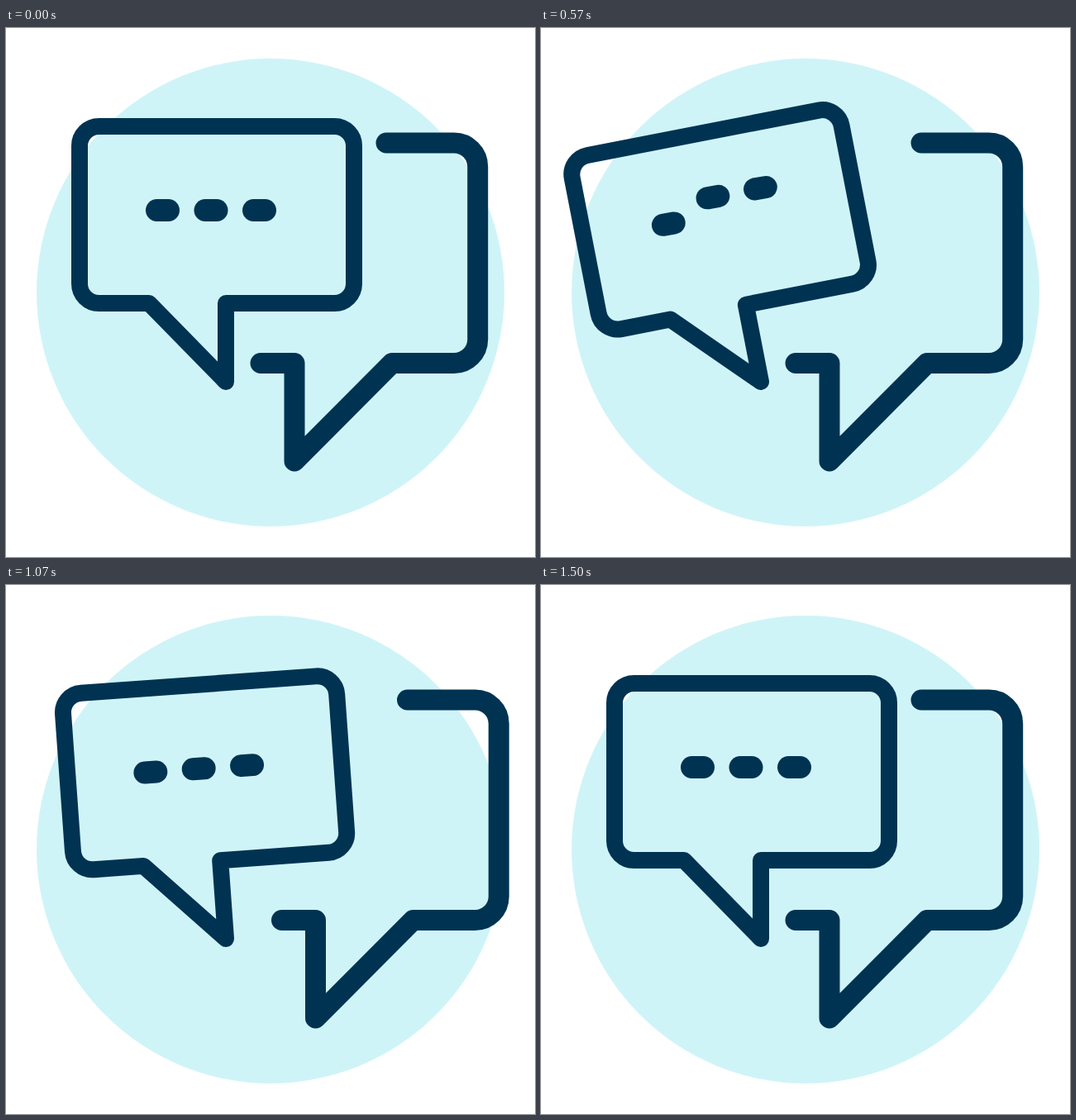
An HTML page for the animation above (2 s loop, 640 by 640 pixels).

```html
<!DOCTYPE html>
<html lang="en">
<head>
<meta charset="utf-8">
<title>Chat bubbles</title>
<style>
  html, body { margin: 0; width: 100%; height: 100%; overflow: hidden; background: #fff; }
  svg { display: block; width: 100%; height: 100%; }
  .line { fill: none; stroke: #003352; stroke-linecap: round; stroke-linejoin: round; }
  .dot { fill: #003352; }
</style>
</head>
<body>
<svg viewBox="0 0 640 640">
  <circle cx="320" cy="320" r="283" fill="#cff4f8"/>
  <path id="back" class="line" stroke-width="25"
    d="M460 139H542A28.7 28.7 0 0 1 570.7 167.7V377A28.7 28.7 0 0 1 542 405.5H467L349 524V405.5H308"/>
  <path id="front" class="line" stroke-width="20"
    d="M266 333H397.5A23.5 23.5 0 0 0 421 309.5V142.5A23.5 23.5 0 0 0 397.5 119H112.5A23.5 23.5 0 0 0 89 142.5V309.5A23.5 23.5 0 0 0 112.5 333H173L266 428Z"/>
  <g id="dots">
    <rect class="dot" x="169" y="207" width="41" height="27" rx="13.5"/>
    <rect class="dot" x="227.5" y="207" width="41" height="27" rx="13.5"/>
    <rect class="dot" x="286" y="207" width="41" height="27" rx="13.5"/>
  </g>
</svg>
<script>
  const LOOP = 2000, FPS = 14;
  const PIVOT = '266 428';
  const HOP = 36, HOP_LEN = 7.9;
  const hopStart = [0, 2.4, 5.65];

  const back = document.getElementById('back');
  const front = document.getElementById('front');
  const dots = document.getElementById('dots');

  // Keys are [step, value]; a third entry is the power of an ease-out into that key.
  const bubbleTilt = [[0, 0], [5.8, 12.5], [6.5, 12.5], [13.2, 0], [15, 4.1], [18.4, 0, 1.9]];
  const dotsTilt = [[0, 0], [5.8, 11.5], [6.3, 11.5], [13.4, 1.1], [15, 4.1], [18.4, 0, 1.9]];
  const backShift = [[12.5, 0], [15, 25.5], [18.3, 0, 1.3]];

  const smooth = p => (1 - Math.cos(Math.PI * p)) / 2;

  function track(keys, s) {
    if (s <= keys[0][0]) return keys[0][1];
    for (let i = 1; i < keys.length; i++) {
      const [s0, v0] = keys[i - 1], [s1, v1, power] = keys[i];
      if (s <= s1) {
        const p = (s - s0) / (s1 - s0);
        return v0 + (v1 - v0) * (power ? 1 - (1 - p) ** power : smooth(p));
      }
    }
    return keys[keys.length - 1][1];
  }

  function hop(s, start) {
    const p = (s - start) / HOP_LEN;
    return p > 0 && p < 1 ? HOP * smooth(2 * p) : 0;
  }

  function draw(ms) {
    const s = Math.floor((ms % LOOP) * FPS / 1000 + 0.06);
    front.setAttribute('transform', `rotate(${-track(bubbleTilt, s)} ${PIVOT})`);
    dots.setAttribute('transform', `rotate(${-track(dotsTilt, s)} ${PIVOT})`);
    back.setAttribute('transform', `translate(${track(backShift, s)} 0)`);
    hopStart.forEach((start, i) =>
      dots.children[i].setAttribute('transform', `translate(0 ${-hop(s, start)})`));
  }

  function tick() {
    draw(performance.now());
    requestAnimationFrame(tick);
  }
  draw(0);
  requestAnimationFrame(tick);
</script>
</body>
</html>
```
